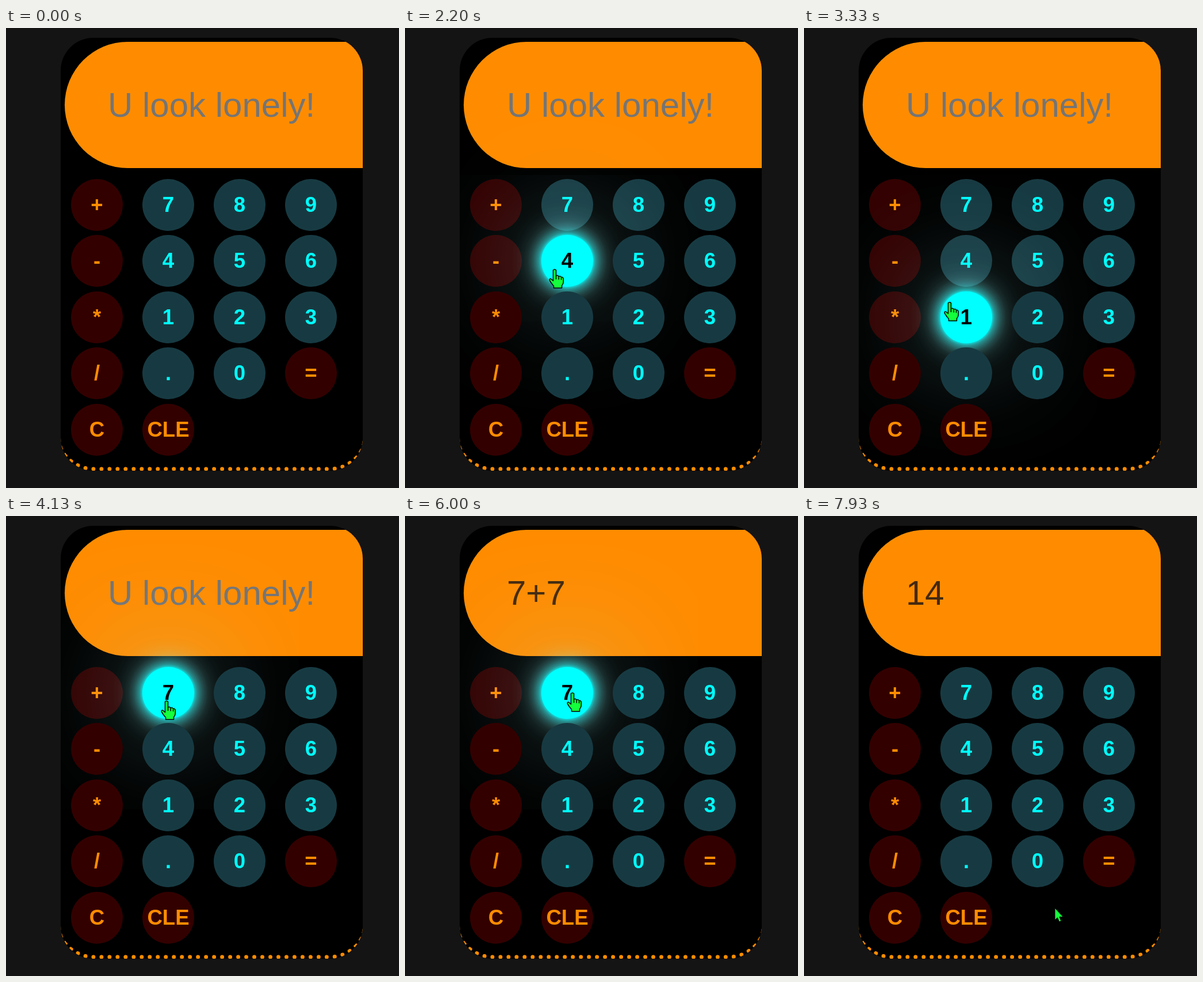
An HTML page that plays this animation: 683x798 px, repeating every 8 s.

```html
<!DOCTYPE html>
<html lang="en">
<head>
<meta charset="utf-8">
<title>Calculator</title>
<style>
  html, body { margin: 0; width: 100%; height: 100%; overflow: hidden; background: #141414; }
  body { position: relative; font-family: "Liberation Sans", Arial, sans-serif; }
  #calc {
    position: absolute; left: 95px; top: 17px; width: 525px; height: 751px;
    box-sizing: border-box; overflow: hidden; background: #000;
    border-radius: 57px; border-bottom: 7px dotted #ff8c00;
  }
  #readout {
    position: absolute; left: 7px; top: 7px; width: 528px; height: 219px;
    padding-left: 75px; border-radius: 110px 0 0 110px;
    background: #ff8c00; color: #44290f;
    font-size: 60px; line-height: 219px; white-space: pre;
  }
  #readout.hint { color: #757575; }
  .key {
    position: absolute; width: 90px; height: 90px; border-radius: 50%;
    background: var(--dim); color: var(--lit);
    font-size: 36.6px; font-weight: bold; line-height: 90px; text-align: center;
  }
  .num { --dim: #173a42; --lit: #00ffff; --halo: #99ffff; }
  .op { --dim: #330000; --lit: #ff8c00; --halo: #ff8c00; }
  .key.on {
    background: var(--lit); color: #000;
    box-shadow: 0 0 5px var(--lit), 0 0 25px var(--lit), 0 0 50px var(--halo), 0 0 200px var(--halo);
  }
  #pointer { position: absolute; left: 0; top: 0; width: 683px; height: 798px; }
  #pointer path { fill: #14ff3c; stroke: #000; stroke-linejoin: round; }
  #pointer .crease { fill: none; }
</style>
</head>
<body>
<div id="calc"><div id="readout"></div></div>
<svg id="pointer" viewBox="0 0 683 798">
  <g id="arrow">
    <path d="M0-1V20L4.5 15.8L7.5 23L11 21.5L8 14.5H14.5Z"/>
  </g>
  <g id="hand" stroke-width="1.5">
    <path d="M-2.5 0Q0-2.500 2.500 0V10Q5 8 7.300 11Q10 9.500 11.600 12.500Q15 11.500 15.300 15.500V21
      Q15 24 12.500 27V31H-1.500V27.500Q-5 24-8.500 18Q-9.500 14.500-6.500 15L-2.500 18.500Z"/>
    <path class="crease" d="M2.500 10V16M7.300 11.500V16.500M11.600 13V17"/>
  </g>
</svg>
<script>
const LOOP = 8000, STEP = 1000 / 15, APPEAR = 660;
const HINT = 'U look lonely!';
const $ = id => document.getElementById(id);
const calc = $('calc'), readout = $('readout'), arrow = $('arrow'), hand = $('hand');

const labels = '+ 7 8 9 - 4 5 6 * 1 2 3 / . 0 = C CLE'.split(' ');
const keys = labels.map((label, i) => {
  const left = 18 + 124 * (i % 4), top = 245 + Math.floor(97.5 * Math.floor(i / 4));
  const el = document.createElement('div');
  el.className = 'key ' + (/[\d.]/.test(label) ? 'num' : 'op');
  el.textContent = label;
  el.style.left = left + 'px';
  el.style.top = top + 'px';
  calc.appendChild(el);
  return { el, label, x: 95 + left + 45, y: 17 + top + 45 };
});

// Eased pointer moves: from time, to time, key to approach, offset from its centre
const moves = [
  [660, 1333, '+', 27, 18],
  [1333, 1400, '-', 58, -8],
  [1530, 1800, '4', -14, -2],
  [2130, 2600, 'C', -27, 2],
  [2800, 3333, '1', -29, -25],
  [3333, 3730, '7', -3, 15],
  [4130, 4530, '7', 0, 1],
  [4790, 5000, '7', -60, 15],
  [5000, 5267, '+', 12, 3],
  [5330, 5600, '7', 9, 1],
  [6130, 7000, '=', -2, -3],
  [7733, 7930, '=', -94, 82]
].map(([from, to, label, dx, dy]) => {
  const key = keys.find(k => k.label === label);
  return { from, to, x: key.x + dx, y: key.y + dy };
});

// Clicks: time and what the readout then shows
const clicks = [[0, HINT], [4800, '7'], [5300, '7+'], [5800, '7+7'], [7190, '14']];

const ease = k => k * k * (3 - 2 * k);

function pointAt(t) {
  if (t < APPEAR) return null;
  let x = 168, y = 712;
  for (const m of moves) {
    if (t <= m.from) break;
    const k = ease(Math.min(1, (t - m.from) / (m.to - m.from)));
    x += (m.x - x) * k;
    y += (m.y - y) * k;
  }
  return { x, y };
}

const keyAt = p => p && keys.find(k => Math.hypot(p.x - k.x, p.y - k.y) < 45);

function place(el, p, visible) {
  el.style.display = visible ? '' : 'none';
  if (visible) el.setAttribute('transform', `translate(${Math.round(p.x)} ${Math.round(p.y)})`);
}

function draw(ms) {
  const t = Math.floor(((ms % LOOP) + 5) / STEP) * STEP % LOOP;
  const p = pointAt(t), over = keyAt(p);
  // The highlight trails the pointer by one step
  const lit = keyAt(pointAt(t - STEP));
  for (const k of keys) k.el.classList.toggle('on', k === lit);
  place(arrow, p, p && !over);
  place(hand, p, p && over);

  const text = clicks.filter(c => c[0] <= t).pop()[1];
  if (readout.textContent !== text) readout.textContent = text;
  readout.classList.toggle('hint', text === HINT);
}

const start = performance.now();
function tick() {
  draw(performance.now() - start);
  requestAnimationFrame(tick);
}
tick();
</script>
</body>
</html>
```
